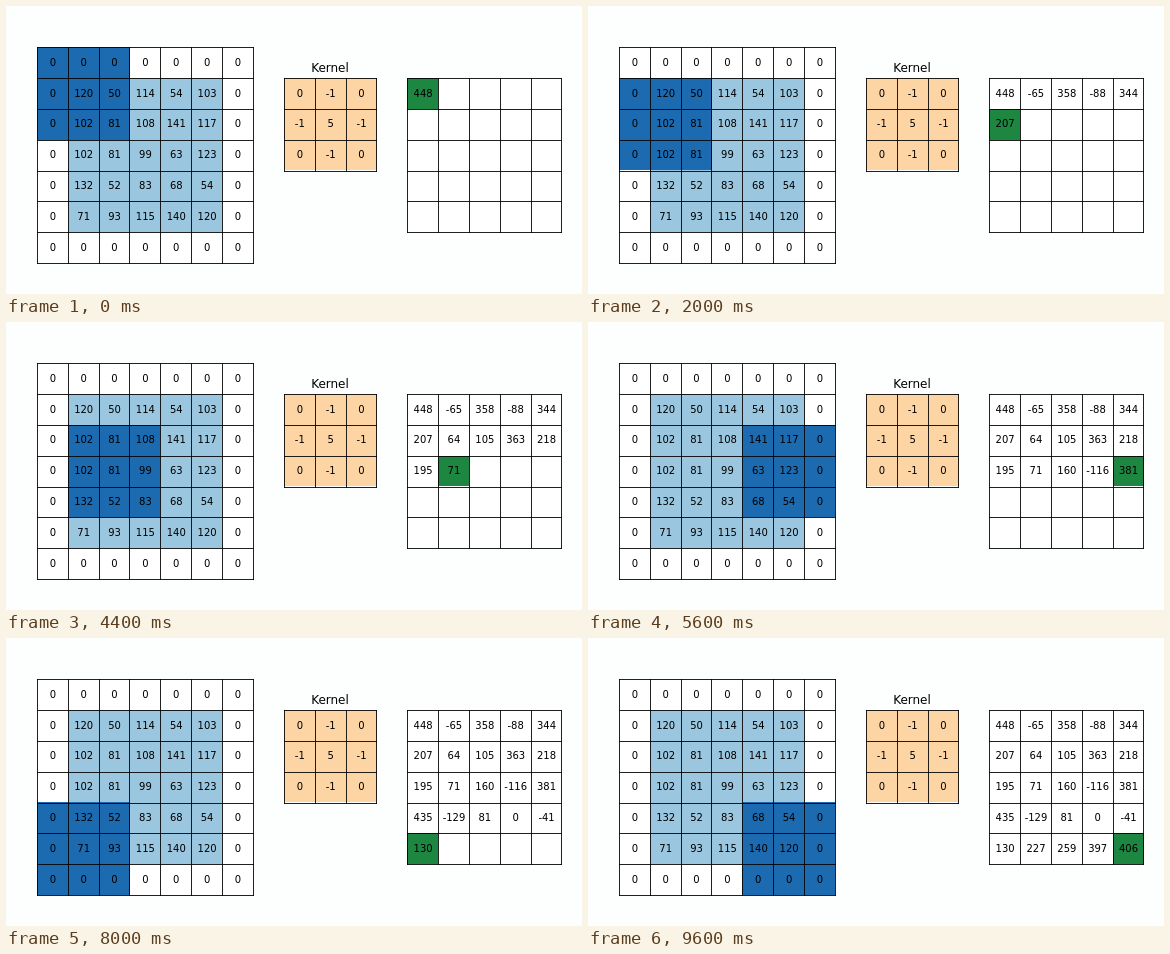
Animation of 576 by 288 pixels, one loop 10 s. Source, as an HTML page:

```html
<!DOCTYPE html>
<html lang="en">
<head>
<meta charset="utf-8">
<title>Kernel convolution</title>
<style>
  html, body { margin: 0; width: 100%; height: 100%; overflow: hidden; background: #fdfefe; }
  svg { display: block; width: 576px; height: 288px; }
  text { font: 10px "DejaVu Sans", sans-serif; text-anchor: middle; fill: #000; }
  .title { font-size: 12px; }
</style>
</head>
<body>
<svg id="stage" viewBox="0 0 576 288"></svg>
<script>
const CELL = 216 / 7, STEP = 400, SIZE = 5;
const LIGHT = '#9ac7df', DARK = '#1c6ab0', ORANGE = '#fdd5a4', GREEN = '#1d8641';
const stage = document.getElementById('stage');

const inner = [
  [120, 50, 114, 54, 103],
  [102, 81, 108, 141, 117],
  [102, 81, 99, 63, 123],
  [132, 52, 83, 68, 54],
  [71, 93, 115, 140, 120]
];
const kernel = [[0, -1, 0], [-1, 5, -1], [0, -1, 0]];
const blank = Array(SIZE + 2).fill(0);
const padded = [blank, ...inner.map(r => [0, ...r, 0]), blank];

const convolve = (r, c) => kernel.reduce((sum, row, i) =>
  sum + row.reduce((s, k, j) => s + k * padded[r + i][c + j], 0), 0);
const result = inner.map((row, r) => row.map((_, c) => convolve(r, c)));

function add(tag, attrs, content) {
  const el = document.createElementNS('http://www.w3.org/2000/svg', tag);
  for (const k in attrs) el.setAttribute(k, attrs[k]);
  if (content !== undefined) el.textContent = content;
  return stage.appendChild(el);
}

// Cell fills, then grid lines, then numbers.
function grid(x, y, values, color) {
  const n = values.length;
  const fx = i => Math.round(x + .14 + i * CELL), fy = i => Math.round(y - .16 + i * CELL);
  const lx = i => Math.round(x + i * CELL) + .5, ly = i => Math.round(y + i * CELL) + .5;
  const each = make => values.map((row, r) => row.map((v, c) => make(r, c, v)));

  const cells = each((r, c) => add('rect', {
    x: fx(c), y: fy(r), width: fx(c + 1) - fx(c), height: fy(r + 1) - fy(r),
    fill: color(r, c), 'shape-rendering': 'crispEdges'
  }));
  let d = '';
  for (let i = 0; i <= n; i++) {
    d += `M${lx(i)} ${ly(0) - .5}V${ly(n) + .5}M${lx(0) - .5} ${ly(i)}H${lx(n) + .5}`;
  }
  add('path', { d, fill: 'none', stroke: '#000', 'stroke-opacity': .87 });
  const labels = each((r, c, v) => add('text', {
    x: x + .5 + (c + .5) * CELL, y: Math.round(y + 3.1 + (r + .5) * CELL)
  }, v));
  return { cells, labels };
}

const baseColor = (r, c) => r > 0 && r <= SIZE && c > 0 && c <= SIZE ? LIGHT : '#fff';
const input = grid(30.9, 41.2, padded, baseColor);
grid(277.9, 72.06, kernel, () => ORANGE);
const output = grid(401.2, 72.06, result, () => '#fff');
add('text', { x: 324, y: 66, class: 'title' }, 'Kernel');

function show(step) {
  const row = Math.floor(step / SIZE), col = step % SIZE;
  const covered = (r, c) => r >= row && r < row + 3 && c >= col && c < col + 3;
  input.cells.forEach((line, r) => line.forEach((cell, c) =>
    cell.setAttribute('fill', covered(r, c) ? DARK : baseColor(r, c))));
  output.cells.forEach((line, r) => line.forEach((cell, c) => {
    const k = r * SIZE + c;
    cell.setAttribute('fill', k === step ? GREEN : '#fff');
    output.labels[r][c].setAttribute('visibility', k <= step ? 'visible' : 'hidden');
  }));
}

let start, current = 0;
function tick(now) {
  start ??= now;
  const step = Math.floor((now - start) / STEP) % (SIZE * SIZE);
  if (step !== current) show(current = step);
  requestAnimationFrame(tick);
}
show(0);
requestAnimationFrame(tick);
</script>
</body>
</html>
```
